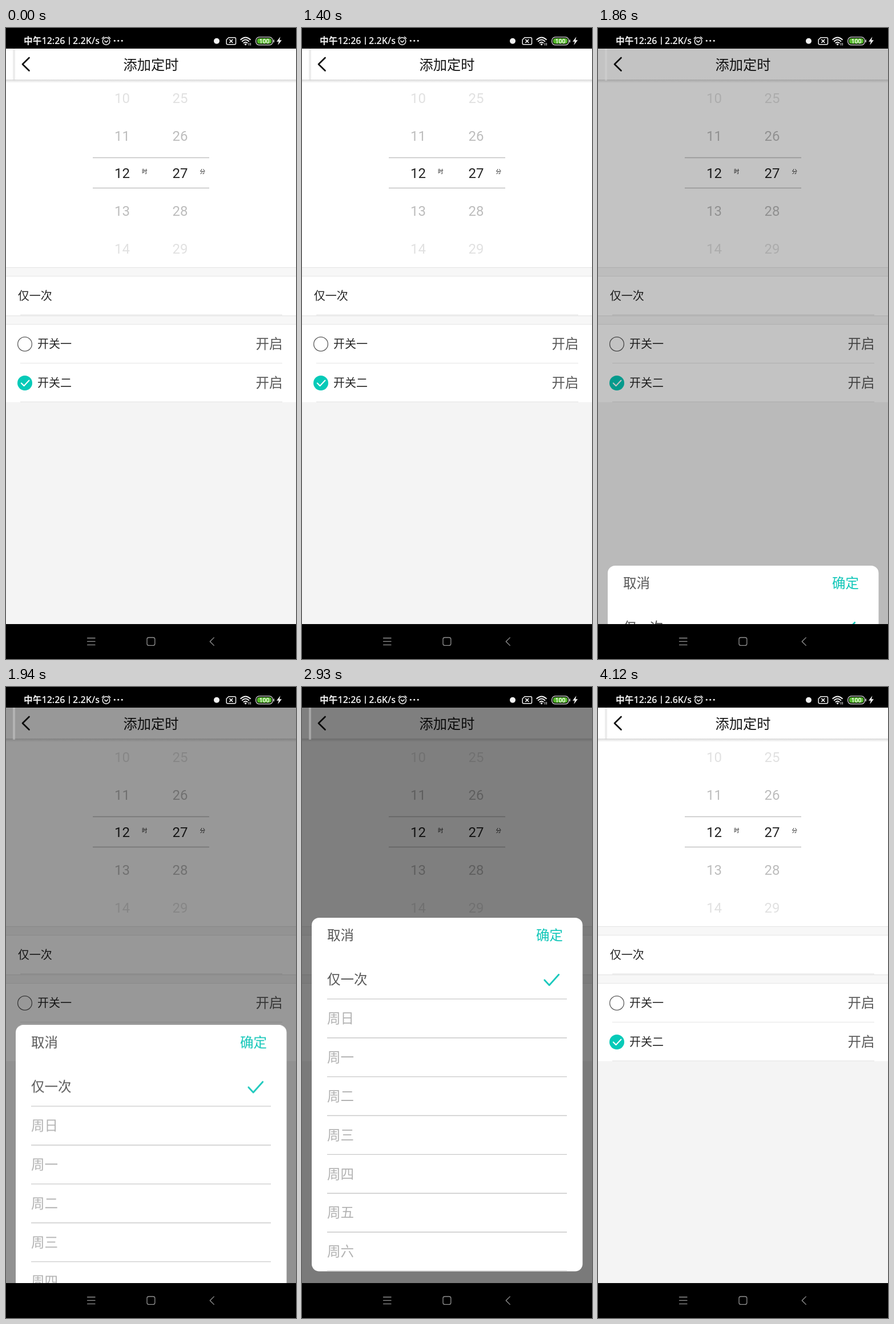
Recreate the animation shown at these times as an HTML page. Size 508 by 1102 pixels, loop 4490 ms.

```html
<!DOCTYPE html>
<html lang="zh-CN">
<head>
<meta charset="utf-8">
<title>添加定时</title>
<style>
html, body { margin: 0; width: 100%; height: 100%; overflow: hidden; background: #000; }
svg { display: block; width: 100vw; height: 100vh; font-family: "Noto Sans CJK SC", "Noto Sans CJK", sans-serif; }
.status { font: 600 16px "Open Sans", "Noto Sans CJK SC", sans-serif; fill: #f2f2f2; }
.zh { font: 700 15.7px "Noto Sans CJK SC", "Noto Sans CJK", sans-serif; }
.num { font: 24px Roboto, sans-serif; text-anchor: middle; }
.label { font-size: 20px; fill: #262626; }
.big { font-size: 23.5px; fill: #585858; }
.day { fill: #b2b2b2; }
.teal { fill: #0fc6b8; }
.line { fill: none; stroke-linecap: round; stroke-linejoin: round; }

/* every part steps on the same 4.49 s clock */
.modal, .dim, .sheet, .before, .after { animation: 4490ms step-end infinite; }
.modal { animation-name: modal; }
.dim { animation-name: dim; }
.sheet { animation-name: sheet; }
.before { animation-name: before; }
.after { animation-name: after; }

@keyframes modal {
  0% { opacity: 0; }
  36.74% { opacity: 1; }
  74.38% { opacity: .6; }
  75.72% { opacity: .2; }
  77.05%, 100% { opacity: 0; }
}
@keyframes dim {
  0% { opacity: 0; }
  38.75% { opacity: .024; }
  39.64% { opacity: .073; }
  40.53% { opacity: .145; }
  41.42% { opacity: .235; }
  42.31% { opacity: .315; }
  43.2% { opacity: .402; }
  44.09% { opacity: .455; }
  44.98% { opacity: .49; }
  45.87%, 100% { opacity: .5; }
}
@keyframes sheet {
  0% { transform: translateY(1105px); }
  41.42% { transform: translateY(939px); }
  42.31% { transform: translateY(748px); }
  43.2% { transform: translateY(590.3px); }
  44.09% { transform: translateY(478px); }
  44.98% { transform: translateY(413px); }
  45.87% { transform: translateY(391.7px); }
  46.76% { transform: translateY(396px); }
  47.65%, 100% { transform: translateY(403px); }
}
@keyframes before {
  0% { opacity: 1; }
  61.46%, 100% { opacity: 0; }
}
@keyframes after {
  0% { opacity: 0; }
  61.46%, 100% { opacity: 1; }
}
</style>
</head>
<body>
<svg viewBox="0 0 508 1102" preserveAspectRatio="none">
  <defs>
    <linearGradient id="shade" x2="0" y2="1">
      <stop stop-color="#d9d9d9"/>
      <stop offset="1" stop-color="#fff"/>
    </linearGradient>
    <g id="alarm" class="line" stroke="#f2f2f2" stroke-width="1.5">
      <circle cx="175.5" cy="23" r="6.3"/>
      <path d="M168.3 18.2l3-2.6M182.7 18.2l-3-2.6M172.8 22.4l2.7 2.5 3-2.8"/>
    </g>
  </defs>

  <!-- page -->
  <rect y="36" width="508" height="1005" fill="#f4f4f4"/>
  <rect y="36" width="508" height="382" fill="#fff"/>
  <rect y="90" width="508" height="6" fill="url(#shade)"/>
  <path class="line" d="M40.5 52L29 63.2 40.5 74.5" stroke="#111" stroke-width="2.7"/>
  <text x="254" y="72.5" font-size="24.2" fill="#151515" text-anchor="middle">添加定时</text>

  <g id="picker"></g>
  <path d="M152 226.5H356M152 279.5H356" stroke="#c2c2c2" stroke-width="1.4"/>
  <g font-size="9.6" fill="#222">
    <text x="238" y="254.3">时</text>
    <text x="339.6" y="254.3">分</text>
  </g>

  <rect y="418" width="508" height="100" fill="#f7f7f7"/>
  <rect y="434" width="508" height="68" fill="#fff"/>
  <rect y="518" width="508" height="135.5" fill="#fff"/>
  <path d="M0 418.3H508M0 433.5H508M0 502.6H508M0 517.5H508" stroke="#e6e6e6" stroke-width="1.2"/>
  <path d="M25 501H484M25 585.3H484M25 653H484" stroke="#e9e9e9" stroke-width="1.3"/>
  <text class="label" x="20.7" y="474.5">仅一次</text>

  <circle cx="33" cy="552" r="12.4" fill="none" stroke="#5c5c5c" stroke-width="1.3"/>
  <circle cx="33" cy="620" r="13" fill="#06cab8"/>
  <path class="line" d="M26.8 620.3l4.8 4.6 8.8-9.4" stroke="#fff" stroke-width="2.1"/>
  <text class="label" x="55" y="558.7">开关一</text>
  <text class="label" x="55" y="626.5">开关二</text>
  <text class="big" x="437.5" y="560">开启</text>
  <text class="big" x="437.5" y="627.8">开启</text>

  <!-- repeat chooser -->
  <g class="modal">
    <rect class="dim" y="36" width="508" height="1005"/>
    <g class="sheet">
      <rect x="17" width="474.5" height="617.5" rx="13" fill="#fff"/>
      <text class="big" x="44" y="39.3">取消</text>
      <text class="big teal" x="410" y="39.3">确定</text>
      <path class="line" d="M424.8 108.8l8.4 9 16.6-18.6" stroke="#1cc9bd" stroke-width="2.8"/>
      <g id="days"></g>
    </g>
  </g>
  <rect x="12" y="36" width="4" height="56" fill="#d5d5d5" opacity=".45"/>

  <!-- status bar -->
  <rect width="508" height="36"/>
  <g class="status">
    <text class="zh" x="31" y="28.4">中午</text>
    <text x="62.5" y="28.2">12:26</text>
    <rect x="110.2" y="15.5" width="1.6" height="13.5"/>
    <g class="before"><text x="117" y="28">2.2K/s</text><use href="#alarm"/></g>
    <g class="after"><text x="117.2" y="28">2.6K/s</text><use href="#alarm" x=".6"/></g>
    <circle cx="190.3" cy="22.3" r="1.5"/>
    <circle cx="196.7" cy="22.3" r="1.5"/>
    <circle cx="203.2" cy="22.3" r="1.5"/>
    <circle cx="369" cy="22.7" r="5"/>
    <path d="M480.5 15.2L474 23.8h3.8L476.2 30 483 21.2h-3.9z"/>
    <circle cx="419.6" cy="28.6" r="1.7"/>
    <path d="M425.6 26v4.4M428.4 26v4.4" stroke="#ddd" stroke-width="1.1"/>
  </g>
  <g class="line" stroke="#f2f2f2" stroke-width="1.5">
    <path d="M390 16.8H400.5a2 2 0 0 1 2 2V26.8a2 2 0 0 1-2 2H388.2a2 2 0 0 1-2-2V20.5zM391.8 20.4l5 5M396.8 20.4l-5 5"/>
    <path stroke-width="1.9" d="M411.2 20.2q8.4-7.6 16.8 0M413.8 23.2q5.8-5.2 11.6 0M416.5 26q3.1-2.7 6.2 0"/>
    <rect x="437.7" y="15.9" width="29.6" height="13.8" rx="6" stroke="#dcdcdc" stroke-width="1.3"/>
    <path d="M469.2 21v3.6" stroke="#dcdcdc"/>
  </g>
  <rect x="439.8" y="18" width="25.4" height="9.6" rx="4" fill="#55b92b"/>
  <text x="452.4" y="26.8" font-family="'Open Sans', sans-serif" font-weight="600" font-size="10.5" fill="#fff" text-anchor="middle">100</text>

  <!-- navigation bar -->
  <rect y="1041" width="508" height="61"/>
  <g class="line" stroke="#929292" stroke-width="1.3">
    <path d="M142.5 1065.5h13.5M142.5 1071.4h13.5M142.5 1077.3h13.5"/>
    <rect x="247" y="1064.5" width="13.8" height="13.8" rx="3"/>
    <path d="M364.3 1064.6l-7 6.9 7 6.9"/>
  </g>
</svg>
<script>
const fill = (id, parts) => document.getElementById(id).innerHTML = parts.join("");

const shades = ["#242424", "#bdbdbd", "#e1e1e1"];
fill("picker", [-2, -1, 0, 1, 2].flatMap(row =>
  [[203.6, 12], [305, 27]].map(([x, value]) =>
    `<text class="num" x="${x}" y="${262.3 + row * 65.6}" fill="${shades[Math.abs(row)]}">${value + row}</text>`)));

const days = ["仅一次", ..."日一二三四五六"].map((day, i) => i ? "周" + day : day);
fill("days", days.map((day, i) => {
  const y = i * 67.86;
  return `<text class="big ${i ? "day" : ""}" x="44" y="${116.3 + y}">${day}</text>
    <path d="M44 ${141.9 + y}H464" stroke="#c9c9c9" stroke-width="1.4"/>`;
}));
</script>
</body>
</html>
```
